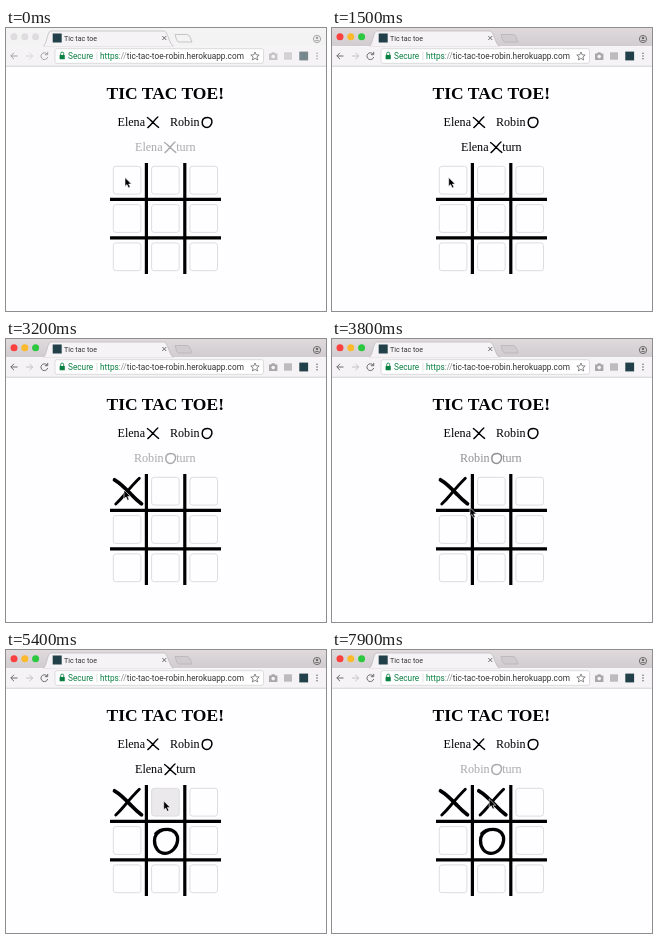
Write an HTML page that moves like this. It is 320 by 283 pixels and loops after 8 s.

```html
<!DOCTYPE html>
<html lang="en">
<head>
<meta charset="utf-8">
<title>Tic tac toe</title>
<style>
  html, body { margin: 0; width: 100%; height: 100%; overflow: hidden; background: #fefdff; }
  svg { display: block; width: 320px; height: 283px; }
  .ui { font-family: Roboto, "Open Sans", sans-serif; font-size: 8.25px; }
  .page { font-family: "Liberation Serif", "Times New Roman", serif; font-size: 12.1px; }
  .ink { fill: none; stroke: #000; stroke-linecap: round; stroke-linejoin: round; }
  .line { fill: none; stroke: #6c6c6c; stroke-width: 1; }
  .inactive .light { fill: #dedcde; }
  .inactive .strip { fill: #f4f3f4; }
  .inactive .icon { opacity: .6; }
</style>
</head>
<body>
<svg id="stage" viewBox="0 0 320 283">
  <defs>
    <linearGradient id="strip" x2="0" y2="1">
      <stop stop-color="#e0dadd"/><stop offset="1" stop-color="#d1cccf"/>
    </linearGradient>
    <!-- big marks are drawn in a 28 unit box, small ones in 12 -->
    <g id="x" class="ink">
      <path stroke-width="3.7" d="M1.5 2.8C8 6.5 14 13 18.5 17.8S25.5 24.5 28.5 26.8"/>
      <path stroke-width="2.9" d="M26.3 1.3C20 7.5 15 13.5 11 18.2S5.5 24.5 2.8 27"/>
    </g>
    <g id="o" class="ink">
      <path stroke-width="3.3" d="M4.5 7.5C7 4 11 3 16 3C23 3 26.8 8 26.3 14S21 27 14 27S3.2 21 3.2 14.5S7 5 12 3.4"/>
    </g>
    <g id="xs" class="ink">
      <path stroke-width="1.4" d="M.8 1.4C4 3.2 8 8.5 12 11.2M11.2 .8C8 3.4 5 8.5 1.2 11.4"/>
    </g>
    <g id="os" class="ink">
      <path stroke-width="1.5" d="M2 3.2C3 1.6 4.8 1.2 6.8 1.2C9.8 1.2 11.3 3.4 11.1 5.9S8.8 11.3 6 11.3S1.4 9 1.4 6.2S3 2 5 1.4"/>
    </g>
  </defs>

  <rect width="320" height="283" fill="#fefdff"/>

  <g class="ui">
    <rect class="strip" width="320" height="18" fill="url(#strip)"/>
    <circle class="light" cx="8" cy="8.8" r="3.5" fill="#fa413f"/>
    <circle class="light" cx="18.8" cy="8.8" r="3.5" fill="#fdb92c"/>
    <circle class="light" cx="29.6" cy="8.8" r="3.5" fill="#2cc840"/>
    <path d="M37 18.5C41 17 41 3 45 3H158C162 3 163 17 168 18.5Z" fill="#f5f3f5" stroke="#b8b6b8" stroke-width=".7"/>
    <path class="strip" d="M169 6.5H181Q183 6.5 184 9L186 14H173.5Q171.5 14 170.6 12Z" fill="#d0cbce" stroke="#b4b2b4" stroke-width=".7"/>
    <rect x="46.7" y="5.5" width="9" height="9" fill="#22404a"/>
    <text x="58" y="12.8" font-size="7.05" fill="#333">Tic tac toe</text>
    <path class="line" d="M156.3 8l4 4m0-4l-4 4"/>
    <g class="icon">
      <circle cx="311" cy="11" r="3.6" fill="none" stroke="#6c6c6c"/>
      <circle cx="311" cy="10" r="1.3" fill="#6c6c6c"/>
      <path d="M308.5 13a3 2 0 0 1 5 0Z" fill="#6c6c6c"/>
    </g>

    <rect y="18.3" width="320" height="20" fill="#f5f3f5"/>
    <rect y="37.8" width="320" height=".7" fill="#c4c2c4"/>
    <g class="icon">
      <path class="line" d="M11.5 28H4.8M8 24.8L4.8 28L8 31.2"/>
      <path class="line" style="stroke:#c4c4c4" d="M20 28H26.7M23.5 24.8L26.7 28L23.5 31.2"/>
      <path class="line" d="M41 26A3.4 3.4 0 1 0 41.7 29M41.7 23.9V26.7H38.9"/>
    </g>
    <rect x="49" y="20.7" width="208.5" height="14.6" rx="2" fill="#fff" stroke="#d0ced0" stroke-width=".7"/>
    <rect x="53.6" y="27" width="5.2" height="4.2" rx=".5" fill="#0b8043"/>
    <path d="M54.7 27V25.6a1.5 1.5 0 0 1 3 0V27" fill="none" stroke="#0b8043" stroke-width=".9"/>
    <text x="62" y="30.7" fill="#0b8043">Secure</text>
    <rect x="90.6" y="23.5" width=".7" height="9" fill="#d4d4d4"/>
    <text x="94" y="30.7" fill="#333"><tspan fill="#0b8043">https</tspan><tspan fill="#888">://</tspan>tic-tac-toe-robin.herokuapp.com</text>
    <path class="line" style="stroke-width:.8" d="M249 24l1.2 2.8 3 .2-2.3 2 .8 3-2.7-1.6-2.7 1.6.8-3-2.3-2 3-.2Z"/>
    <g class="icon">
      <path fill="#a8a8a8" d="M263 25.5h2l1-1.3h2.4l1 1.3h2V32H263Z"/>
      <circle cx="267.2" cy="28.6" r="1.8" fill="#f5f3f5"/>
      <rect x="278" y="24.3" width="8" height="7.4" fill="#bcbcbe"/>
      <rect x="293.3" y="23.6" width="8.8" height="8.8" fill="#22404a"/>
      <g fill="#6c6c6c"><circle cx="311" cy="25.2" r=".8"/><circle cx="311" cy="28" r=".8"/><circle cx="311" cy="30.8" r=".8"/></g>
    </g>
  </g>

  <g class="page">
    <text x="159.3" y="71.2" font-size="17.5" font-weight="bold" text-anchor="middle">TIC TAC TOE!</text>
    <text x="111.5" y="98.2">Elena</text>
    <use href="#xs" x="140.6" y="88.2"/>
    <text x="164" y="98.2">Robin</text>
    <use href="#os" x="194.8" y="88.2"/>
    <g id="turn">
      <g id="turnX"><text x="129" y="123.3">Elena</text><use href="#xs" x="157.8" y="113.2"/></g>
      <g id="turnO"><text x="128" y="123.3">Robin</text><use href="#os" x="158.4" y="113.2"/></g>
      <text x="170.2" y="123.3">turn</text>
    </g>
  </g>

  <g id="cells" stroke="#dadadc" stroke-width=".9"></g>
  <path d="M140.4 135V246M178.8 135V246M104 171.4H215M104 209.8H215" stroke="#000" stroke-width="3.2"/>
  <g id="marks"></g>
  <path id="cursor" d="M0 0V8.8L2 7L3.5 10.3L5.2 9.5L3.7 6.4H6.5Z" fill="#000" stroke="#fff" stroke-width=".6"/>
</svg>

<script>
const LOOP = 8000, STEP = 100, BLINK = 1000, FOCUS_AT = 1300;
const $ = id => document.getElementById(id);

function add(parent, tag, attrs) {
  const el = document.createElementNS("http://www.w3.org/2000/svg", tag);
  for (const key in attrs) el.setAttribute(key, attrs[key]);
  return parent.appendChild(el);
}

const cellX = i => 107.3 + 38.3 * (i % 3);
const cellY = i => 138.3 + 38.3 * Math.floor(i / 3);

const cells = Array.from({ length: 9 }, (_, i) => add($("cells"), "rect", {
  x: cellX(i), y: cellY(i), width: 27.6, height: 27.8, rx: 2.6
}));

const moves = [
  { at: 2500, cell: 0, mark: "x" },
  { at: 4300, cell: 4, mark: "o" },
  { at: 7100, cell: 1, mark: "x" }
];
for (const m of moves) {
  m.el = add($("marks"), "use", { href: "#" + m.mark, x: cellX(m.cell) - .3, y: cellY(m.cell) - .3 });
}

// time, x, y of the pointer tip
const path = [
  [0, 119, 149.6], [900, 119, 149.6], [1300, 116.7, 149.6], [2300, 116.7, 149.6], [2700, 118, 151],
  [3500, 118, 151], [4100, 158, 186], [4700, 158, 186], [5200, 157.7, 151],
  [6000, 157.7, 151], [6400, 157.2, 148.8], [LOOP, 157.2, 148.8]
];
// phase, opacity of the turn line
const blink = [[0, .33], [200, .33], [400, 1], [550, 1], [880, .33], [BLINK, .33]];

const ease = p => p * p * (3 - 2 * p);

function sample(track, t) {
  const i = track.findIndex(k => k[0] > t);
  const a = track[i - 1], b = track[i];
  const p = ease((t - a[0]) / (b[0] - a[0]));
  return a.slice(1).map((v, n) => v + (b[n + 1] - v) * p);
}

const show = (el, on) => { el.style.display = on ? "" : "none"; };

function draw(now) {
  const t = Math.floor(now % LOOP / STEP) * STEP;
  const [x, y] = sample(path, t);
  const played = moves.filter(m => t >= m.at);

  $("stage").classList.toggle("inactive", t < FOCUS_AT);
  for (const m of moves) show(m.el, played.includes(m));
  cells.forEach((cell, i) => {
    show(cell, !played.some(m => m.cell === i));
    const over = x > cellX(i) && x < cellX(i) + 28 && y > cellY(i) && y < cellY(i) + 28;
    cell.setAttribute("fill", over && i === 1 ? "#ebe9eb" : "#fefdff");
  });
  show($("turnX"), played.length % 2 === 0);
  show($("turnO"), played.length % 2 === 1);
  $("turn").setAttribute("opacity", sample(blink, t % BLINK)[0]);
  $("cursor").setAttribute("transform", `translate(${x} ${y})`);
}

const start = performance.now();
function tick() {
  draw(performance.now() - start);
  requestAnimationFrame(tick);
}
tick();
</script>
</body>
</html>
```
